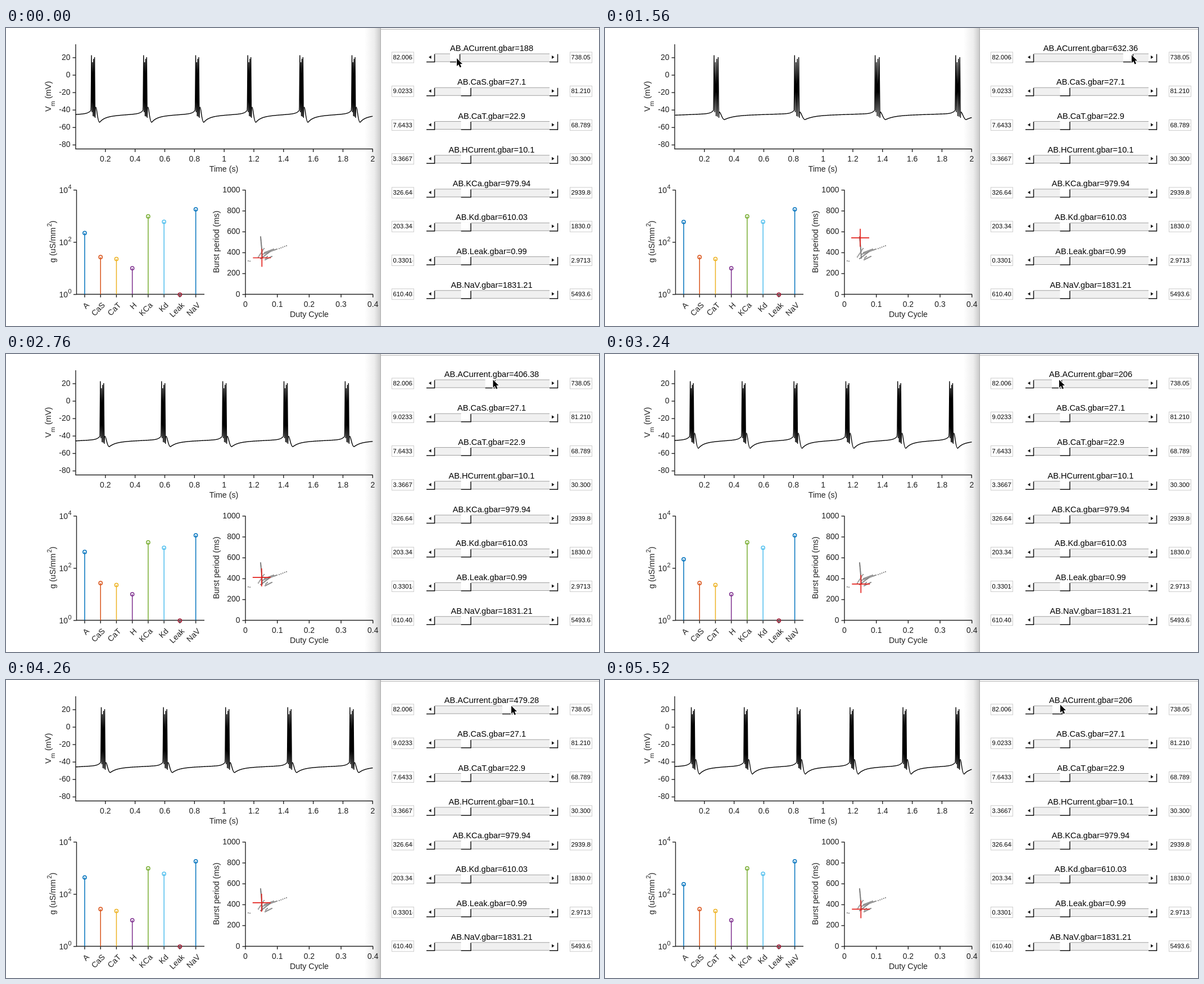
An HTML page with a canvas that plays this animation: 1055x531 px, repeating every 5580 ms.

```html
<!DOCTYPE html>
<html lang="en">
<head>
<meta charset="utf-8">
<title>Conductance sliders</title>
<style>
html, body { margin: 0; width: 100%; height: 100%; overflow: hidden; background: #fff; }
canvas { display: block; }
</style>
</head>
<body>
<canvas id="stage" width="1055" height="531"></canvas>
<script>
const ctx = document.getElementById('stage').getContext('2d');
const LOOP = 5580, STEP = 60;
const INK = '#222';

// time, thumb left, label step, conductance, cursor x, cursor y
const MOTION = [
  [0, 790, 29, 226, 802, 54],
  [180, 777, 16, 165, 790, 54],
  [420, 765, 3, 98, 779, 53],
  [660, 775, 8, 96, 790, 52],
  [960, 817, 40, 156, 832, 51],
  [1320, 880, 106, 430, 895, 49],
  [1680, 938, 168, 670, 953, 48],
  [1920, 942, 173, 712, 957, 47],
  [2160, 926, 159, 690, 941, 47],
  [2700, 860, 96, 450, 874, 46],
  [3240, 795, 34, 221, 808, 46],
  [3480, 780, 18, 150, 794, 46],
  [3780, 800, 30, 150, 815, 46],
  [4260, 883, 109, 442, 899, 46],
  [4560, 908, 140, 580, 923, 47],
  [4740, 900, 137, 610, 914, 48],
  [5040, 845, 97, 498, 857, 49],
  [5280, 810, 52, 330, 823, 46],
  [5520, 796, 34, 244, 810, 44]
];

// conductance, first burst, period, burst width, hump y, trough y, trough offset
const BURST = [
  [80, 18, 83, 5, 138, 173, 13.5],
  [156, 22, 87, 5.2, 140, 170, 14],
  [225, 28, 92.6, 5.5, 141, 168, 14.5],
  [442, 45.5, 110.6, 6, 147, 165, 16],
  [498, 53, 119, 6.5, 148, 164, 17.5],
  [690, 85, 165.5, 8, 151, 163, 19],
  [720, 91, 176, 8.2, 151, 163, 19]
];

const ROWS = [
  ['ACurrent', '', '82.0063', '738.057'],
  ['CaS', '27.1', '9.02333', '81.210'],
  ['CaT', '22.9', '7.6433', '68.7893'],
  ['HCurrent', '10.1', '3.36677', '30.3009'],
  ['KCa', '979.94', '326.648', '2939.80'],
  ['Kd', '610.03', '203.343', '1830.09'],
  ['Leak', '0.99', '0.33014', '2.97133'],
  ['NaV', '1831.21', '610.403', '5493.63']
];

const STEMS = [
  ['A', 0, '#0072bd'], ['CaS', 27.1, '#d95319'], ['CaT', 22.9, '#edb120'],
  ['H', 10.1, '#7e2f8e'], ['KCa', 979.94, '#77ac30'], ['Kd', 610.03, '#4dbeee'],
  ['Leak', 0.99, '#a2142f'], ['NaV', 1831.21, '#0072bd']
];

// dotted runs: x0, y0, x1, y1, count
const TRAILS = [
  [453, 372, 455, 394, 18], [455, 394, 456, 410, 12], [449, 408, 459, 393, 8],
  [453, 411, 469, 399, 12], [457, 403, 482, 394, 14], [460, 400, 476, 394, 9],
  [486, 393, 499, 388, 5], [461, 413, 473, 407, 8], [462, 410, 465, 407, 3],
  [431, 415, 434, 415.5, 2]
];

// Smooth interpolation through the rows of a table, keyed by column 0
function sample(table, key) {
  const last = table.length - 1;
  let i = 0;
  while (i < last - 1 && key >= table[i + 1][0]) i++;
  const a = table[i], b = table[i + 1], span = b[0] - a[0];
  const u = Math.min(1, Math.max(0, (key - a[0]) / span));
  const p = table[Math.max(0, i - 1)], n = table[Math.min(last, i + 2)];
  return a.map((v, c) => {
    const m0 = (b[c] - p[c]) / (b[0] - p[0]) * span;
    const m1 = (n[c] - v) / (n[0] - a[0]) * span;
    const d = b[c] - v;
    return v + u * (m0 + u * (3 * d - 2 * m0 - m1 + u * (m0 + m1 - 2 * d)));
  });
}

function line(x0, y0, x1, y1, color = INK, width = 1.4) {
  ctx.strokeStyle = color;
  ctx.lineWidth = width;
  ctx.beginPath();
  ctx.moveTo(x0, y0);
  ctx.lineTo(x1, y1);
  ctx.stroke();
}

function text(s, x, y, align = 'center', size = 14, angle = 0, color = INK) {
  ctx.save();
  ctx.translate(x, y);
  ctx.rotate(angle);
  ctx.font = size + 'px "Liberation Sans", Arial, sans-serif';
  ctx.textAlign = align;
  ctx.textBaseline = 'middle';
  ctx.fillStyle = color;
  ctx.fillText(s, 0, 0);
  ctx.restore();
}

function frame(x, top, right, bottom) {
  line(x, top, x, bottom);
  line(x - 0.7, bottom, right, bottom);
}

function xTick(x, y, label) {
  line(x, y, x, y + 5.5);
  if (label) text(label, x, y + 18.5);
}

function yTick(x, y, label) {
  line(x - 5.5, y, x, y);
  if (label) text(label, x - 9.5, y, 'right');
}

function drawAxes() {
  const up = -Math.PI / 2;

  frame(124, 29, 652.5, 215.5);
  for (let i = 1; i <= 10; i++) xTick(124 + i * 52.83, 215.5, String(i / 5));
  for (let v = -80; v <= 20; v += 20) yTick(124, 84 - v * 1.555, String(v));
  text('Time (s)', 387.5, 252, 'center', 14.2);
  text('V', 76, 149, 'left', 14.4, up);
  text('m', 84, 139.5, 'left', 11, up);
  text('(mV)', 76, 126, 'left', 14.4, up);

  frame(125.5, 288.5, 353, 474.5);
  for (let p = 0; p <= 4; p += 2) {
    const y = 474.8 - p * 46.5;
    yTick(125.5, y);
    text('10', 94.5, y + 1.5, 'left');
    text(String(p), 110.5, y - 5, 'left', 11);
  }
  text('g (uS/mm', 84.5, 418, 'left', 14.4, up);
  text('2', 78, 354, 'left', 11, up);
  text(')', 84.5, 348, 'left', 14.4, up);

  frame(426, 288.5, 653, 474.5);
  for (let i = 0; i <= 4; i++) xTick(426 + i * 56.7, 474.5, String(i / 10));
  for (let i = 0; i <= 5; i++) yTick(426, 474.8 - i * 37.2, String(i * 200));
  text('Duty Cycle', 539.5, 511, 'center', 14.3);
  text('Burst period (ms)', 375, 381, 'center', 14.5, up);
}

function drawVoltage(g) {
  const [, first, period, width, hump, trough, reach] = sample(BURST, g);
  const rise = (x0, y0, x1, bend) => {
    for (let x = x0; x < Math.min(x1, 653); x += 0.5) {
      const u = (x - x0) / (x1 - x0);
      const climb = bend * (1 - Math.exp(-u / 0.12)) + (1 - bend) * u;
      ctx.lineTo(x, y0 - (y0 - 152.5) * climb - 6 * Math.exp((x - x1) / 5));
    }
  };
  const tops = [48.5, 61, 55, 52], lows = [150, 157, 158, 160];

  ctx.save();
  ctx.beginPath();
  ctx.rect(123, 25, 529.5, 190);
  ctx.clip();
  ctx.beginPath();
  const startY = 153.4 + g / 300;
  ctx.moveTo(124, startY);
  let x = 124 + first;
  rise(124, startY, x - 0.8, 0);
  for (let i = 0; x < 655; i++) {
    const early = g < 200 && i < 2;
    const w = width + (early ? 2 : 0);
    ctx.lineTo(x - 0.8, 140);
    for (let s = 0; s < 4; s++) {
      const sx = x + s * w / 3;
      ctx.lineTo(sx, tops[s]);
      ctx.lineTo(sx + w / 6, lows[s]);
    }
    const hx = x + w + 2.3, tx = x + reach + (early ? 1.5 : 0);
    ctx.quadraticCurveTo(hx - 0.8, hump, hx, hump);
    ctx.bezierCurveTo(hx + 2, hump, tx - 4, trough, tx, trough);
    if (g > 660 && i === 1) {
      // too much outward current: the third burst fails
      for (let fx = tx; fx < 653; fx++) {
        const d = (fx - tx - 152) / 45;
        ctx.lineTo(fx, trough - 10 * (1 - Math.exp((tx - fx) / 60)) - 3 * Math.exp(-d * d));
      }
      break;
    }
    x += period + (early ? 8 : 0);
    rise(tx, trough, x - 0.8, 0.65);
  }
  ctx.strokeStyle = '#000';
  ctx.lineWidth = 1.4;
  ctx.lineJoin = 'bevel';
  ctx.stroke();
  ctx.restore();
  return period / 0.264;
}

function drawStems(g) {
  STEMS.forEach(([name, value, color], i) => {
    const x = 140 + i * 28.23;
    const y = 474.8 - 46.5 * Math.log10(value || g);
    xTick(x, 474.5);
    text(name, x + 6, 492, 'right', 14, -Math.PI / 4);
    line(x, 474.5, x, y, color, 1.5);
    ctx.beginPath();
    ctx.arc(x, y, 3.1, 0, 7);
    ctx.stroke();
  });
}

function drawScatter(g, period) {
  ctx.fillStyle = '#7c7c7c';
  for (const [x0, y0, x1, y1, n] of TRAILS) {
    for (let i = 0; i < n; i++) {
      const u = i / (n - 1);
      ctx.beginPath();
      ctx.arc(x0 + (x1 - x0) * u, y0 + (y1 - y0) * u, 1.1, 0, 7);
      ctx.fill();
    }
  }
  if (g > 650) return;
  const x = 455.3 - Math.max(0, g - 300) / 250, y = 474.8 - period * 0.186;
  line(x - 16, y, x + 16, y, '#e3211c', 1.7);
  line(x, y - 16, x, y + 16, '#e3211c', 1.7);
}

function drawPanel() {
  const shade = ctx.createLinearGradient(638, 0, 667, 0);
  shade.addColorStop(0, 'rgba(0,0,0,0)');
  shade.addColorStop(0.6, 'rgba(0,0,0,.07)');
  shade.addColorStop(1, 'rgba(0,0,0,.22)');
  ctx.fillStyle = shade;
  ctx.fillRect(638, 0, 29, 531);
  ctx.fillStyle = '#fff';
  ctx.fillRect(667, 0, 388, 531);
  ctx.fillStyle = '#f6f6f6';
  ctx.fillRect(667, 0, 388, 2);
  line(667, 2.5, 1055, 2.5, '#bbb', 1);
  line(666.5, 0, 666.5, 531, '#aaa', 1);
}

function drawField(x, y, value) {
  ctx.strokeStyle = '#ccc';
  ctx.lineWidth = 1;
  ctx.strokeRect(x + 0.5, y - 9.5, 39, 19);
  ctx.save();
  ctx.beginPath();
  ctx.rect(x, y - 9, 37.5, 18);
  ctx.clip();
  text(value, x + 2.5, y + 0.5, 'left', 11.2, 0, '#000');
  ctx.restore();
}

// White block with dark right and lower edges
function drawBlock(x, y, width) {
  ctx.fillStyle = '#fff';
  ctx.fillRect(x, y - 7.5, width, 15.5);
  line(x, y + 8, x + width, y + 8, '#111', 1.5);
  line(x + width - 0.5, y - 6, x + width - 0.5, y + 8.6, '#111', 1.5);
}

function drawArrow(x, y, dir) {
  ctx.fillStyle = '#111';
  ctx.beginPath();
  ctx.moveTo(x + 2.5 * dir, y);
  ctx.lineTo(x - 2 * dir, y - 3);
  ctx.lineTo(x - 2 * dir, y + 3);
  ctx.fill();
}

function drawSliders(thumb, value) {
  ROWS.forEach(([name, fixed, low, high], i) => {
    const y = 52.5 + i * 60.25;
    text('AB.' + name + '.gbar=' + (fixed || value), 864, y - 15.5, 'center', 14.6, 0, '#000');
    drawField(686, y, low);
    drawField(1003, y, high);
    ctx.fillStyle = '#f0f0f0';
    ctx.fillRect(763, y - 6.5, 204, 14);
    line(763, y - 6.5, 967, y - 6.5, '#a0a0a0', 1);
    line(763, y + 7.5, 967, y + 7.5, '#a0a0a0', 1);
    drawBlock(748, y, 15);
    drawBlock(967, y, 15);
    drawArrow(754.5, y - 0.5, -1);
    drawArrow(973, y - 0.5, 1);
    drawBlock(i ? 809.5 : thumb, y, 18);
  });
}

function drawCursor(x, y) {
  const shape = [0, 0, 0, 14, 3.2, 11, 5.6, 16.2, 8, 15.2, 5.8, 10, 10, 10];
  ctx.beginPath();
  for (let i = 0; i < shape.length; i += 2) ctx.lineTo(x + shape[i], y + shape[i + 1]);
  ctx.closePath();
  ctx.strokeStyle = '#fff';
  ctx.lineWidth = 2;
  ctx.stroke();
  ctx.fillStyle = '#000';
  ctx.fill();
}

function draw(time) {
  const [, thumb, k, g, cx, cy] = sample(MOTION, time);
  const raw = 82.006 + Math.round(k) * 3.6447;
  const value = raw < 300 ? String(Math.round(raw)) : String(+raw.toFixed(2));
  ctx.fillStyle = '#fff';
  ctx.fillRect(0, 0, 1055, 531);
  drawAxes();
  const period = drawVoltage(g);
  drawStems(g);
  drawScatter(g, period);
  drawPanel();
  drawSliders(thumb, value);
  drawCursor(cx, cy);
}

const start = performance.now();
function tick() {
  const t = (performance.now() - start) % LOOP;
  draw(Math.floor(t / STEP) * STEP);
  requestAnimationFrame(tick);
}
tick();
</script>
</body>
</html>
```
